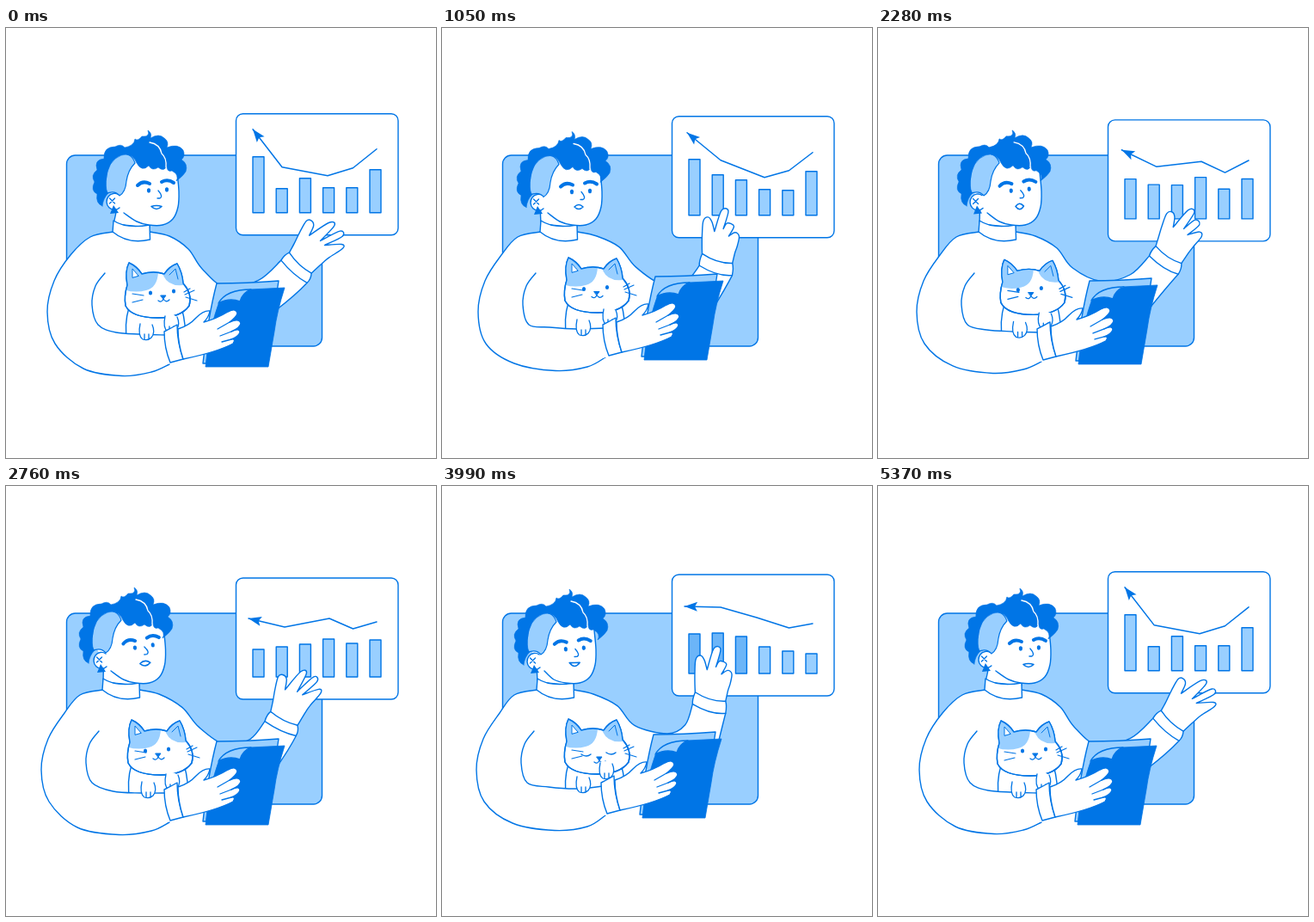
An HTML page with a canvas for the animation above (5400 ms loop, 500 by 500 pixels).

```html
<!DOCTYPE html>
<html>
<head>
<meta charset="utf-8">
<style>
html, body { margin: 0; width: 100%; height: 100%; overflow: hidden; background: #fff; }
canvas { display: block; width: 500px; height: 500px; }
</style>
</head>
<body>
<canvas id="stage" width="500" height="500"></canvas>
<script>
const ctx = document.getElementById('stage').getContext('2d');
const BLUE = '#0075e6', SKY = '#99cfff', WHITE = '#fff', LOOP = 5400;
const POSES = [0, 1050, 1710, 2760, 3990, 4770];
const BEATS = [0, 570, 1050, 1710, 2310, 2760, 3420, 3990, 4560, 4770, 5160];
let time = 0;

// Eased value at the current time; the last key leads back to the first.
function at(vals, keys = BEATS) {
  let i = keys.length - 1;
  while (keys[i] > time) i--;
  const end = keys[i + 1] ?? LOOP, next = vals[(i + 1) % vals.length];
  const u = (time - keys[i]) / (end - keys[i]);
  return vals[i] + (next - vals[i]) * u * u * (3 - 2 * u);
}
const pose = (...vals) => at(vals, POSES);
const beat = (...vals) => at(vals);

function shape(d, fill, stroke = BLUE, width = 1.4) {
  const p = new Path2D(d);
  if (fill) { ctx.fillStyle = fill; ctx.fill(p); }
  if (stroke) { ctx.strokeStyle = stroke; ctx.lineWidth = width; ctx.stroke(p); }
}
const line = (d, width, color = BLUE) => shape(d, null, color, width);

function dot(x, y, rx, ry = rx, fill = BLUE, stroke = null) {
  ctx.beginPath();
  ctx.ellipse(x, y, rx, ry, 0, 0, 7);
  ctx.fillStyle = fill;
  ctx.fill();
  if (stroke) { ctx.strokeStyle = stroke; ctx.lineWidth = 1.4; ctx.stroke(); }
}

function box(x, y, w, h, r, fill) {
  ctx.beginPath();
  ctx.roundRect(x, y, w, h, r);
  ctx.fillStyle = fill;
  ctx.fill();
  ctx.strokeStyle = BLUE;
  ctx.lineWidth = 1.4;
  ctx.stroke();
}

function group(x, y, draw, angle = 0) {
  ctx.save();
  ctx.translate(x, y);
  ctx.rotate(angle * Math.PI / 180);
  draw();
  ctx.restore();
}

// Smooth path text through points given as x, y, x, y...
function spline(...n) {
  const last = n.length / 2 - 1;
  const pt = i => { i = Math.max(0, Math.min(last, i)) * 2; return [n[i], n[i + 1]]; };
  let d = pt(0).join(' ');
  for (let i = 0; i < last; i++) {
    const [a, b, c, e] = [pt(i - 1), pt(i), pt(i + 1), pt(i + 2)];
    const p = k => b[k] + (c[k] - a[k]) / 6, q = k => c[k] - (e[k] - b[k]) / 6;
    d += `C${p(0)} ${p(1)} ${q(0)} ${q(1)} ${c[0]} ${c[1]}`;
  }
  return d;
}

function board() {
  const y = 103.4 - 3.7 * Math.cos((time + 150) / LOOP * 2 * Math.PI);
  group(0, y, () => {
    box(267.5, 0, 188.5, 141, 8, WHITE);
    const heights = [
      pose(65, 65, 65, 32, 46, 55), pose(28, 47, 46, 35, 47, 38),
      pose(40, 41, 41, 38, 43, 42), pose(29, 30, 54, 44, 31, 30),
      pose(29, 29, 29, 39, 26, 28), pose(50, 51, 51, 43, 23, 36)];
    const shade = beat(0, 0, 0, 0, 0, 0, .15, .3, 0, 0, 0);
    heights.forEach((h, i) => {
      const x = 287 + i * 27.2;
      box(x, 115 - h, 13, h, 0, SKY);
      if (i < 3 && shade) {
        ctx.globalAlpha = shade;
        shape(`M${x} ${115 - h}h13v${h}h-13z`, BLUE, null);
        ctx.globalAlpha = 1;
      }
    });
    const tx = pose(287, 285, 285, 282, 282, 284), ty = pose(18, 19, 19, 47, 37, 28);
    const bx = pose(321, 324, 324, 324, 324, 322), by = pose(62, 51, 51, 57, 38, 50);
    line(`M${tx} ${ty}L${bx} ${by}L${pose(374, 375, 376, 376, 366, 375)} ${pose(72, 71, 50, 47, 50, 62)}
      L403.5 ${pose(63, 63, 64, 59, 62, 63)}L431 ${pose(41, 42, 42, 51, 57, 50)}`, 1.5);
    group(tx, ty, () => shape('M0 0L15 -5.5L12 0L15 5.5Z', BLUE, null),
      Math.atan2(by - ty, bx - tx) * 180 / Math.PI);
  });
}

const OPEN = [-18, -1, -20, -13, -23, -27, -25, -42, -21, -46, -15, -43, -12, -31, -3, -57, 4, -58,
  2, -34, 13, -57, 19, -54, 9, -33, 24, -46, 28, -43, 22, -25, 20, -16, 17, 2, -20, 12, 20, 14];
const POINT = [-18, -5, -19, -14, -20, -28, -20, -43, -15, -48, -10, -43, -6, -32, 0, -57, 8, -57,
  4, -36, 8, -43, 16, -40, 11, -28, 18, -33, 23, -29, 22, -18, 20, -10, 18, 3, -20, 9, 19, 17];

// Torso, far sleeve and the raised hand
function torso(bx, by, nx, cy) {
  const wx = beat(343, 328, 320, 347, 338, 324, 318, 312, 317, 321, 340);
  const wy = beat(273, 272, 269, 258, 264, 270, 259, 246, 264, 269, 273);
  const deg = beat(38, 20, 5, 27, 25, 22, 13, 4, 18, 21, 36), a = deg * Math.PI / 180;
  const curl = beat(0, 0, 1, 1, .5, 0, .5, 1, .1, 0, 0);
  const n = OPEN.map((v, i) => v + (POINT[i] - v) * curl);
  const world = i => [wx + n[i] * Math.cos(a) - n[i + 1] * Math.sin(a),
    wy + n[i] * Math.sin(a) + n[i + 1] * Math.cos(a)];
  const [lx, ly] = world(36), [rx, ry] = world(38);
  const ex = pose(256, 256, 265, 255, 262, 254), ey = pose(302, 298, 286, 301, 288, 301);
  const top = spline(167 + nx, 237, 190 + nx, 242, 212 + nx * .6, 257 + by * .4,
    228 + nx * .3, 280 + by * .4, ex, ey, (ex + lx) / 2 + 6, (ey + ly) / 2 + 7, lx, ly);
  const outer = spline(125 + nx, 237, 98 + nx, 243, 75 + bx, 264, 56 + bx, 294, 48 + bx, 330,
    57 + bx, 367, 90 + bx, 396 + by, 135 + bx / 2, 404.5 + by, 169, 400 + by, 190, 391 + cy);
  shape(`M${top}L${rx} ${ry}Q${(rx + 322) / 2} ${ry + 15} 314 328L280 360L205 386L190 391
    L125 380L${60 + bx} 340L${80 + bx} 262L${125 + nx} 237Z`, WHITE, null);
  shape('M' + outer + `L190 340L${125 + nx} 237`, WHITE, null);
  line('M' + top);
  line('M' + outer);
  line(`M${rx} ${ry}Q${(rx + 322) / 2} ${ry + 15} 314 328`);

  group(wx, wy, () => {
    shape(`M${n[36]} ${n[37]}Q${n[36] - 1} 4 ${n[0]} ${n[1]}L${n[34]} ${n[35]}
      Q${n[38] + 1} 8 ${n[38]} ${n[39]}Q2 ${n[39] + 3} ${n[36]} ${n[37]}Z`, WHITE);
    shape('M' + spline(...n.slice(0, 14)) + 'L' + spline(...n.slice(12, 20)) +
      'L' + spline(...n.slice(18, 26)) + 'L' + spline(...n.slice(24, 36)) +
      `Q0 5 ${n[0]} ${n[1]}Z`, WHITE);
  }, deg);
}

function head(nx) {
  const hx = beat(0, -12, -14, -1, -9, -16, -17, -17, -13, -11, -3);
  const hy = pose(0, 1.5, 1, -1, 1, 1);
  const ex = beat(0, -10, -14, -4, -10, -15, -17, -18, -12, -9, -2);
  const fx = beat(0, -11, -15, -6, -11, -15.5, -18, -22, -14, -10, -2);
  const fy = pose(0, 1.5, 2, -2, .5, 1.5);

  shape(`M${129 + ex} 205Q${128 + ex} 217 ${125 + nx} 228L${167 + nx} 232L${168 + fx} 222Z`, WHITE);
  shape(`M${125 + nx} 224Q${140 + nx} 234 ${167 + nx} 229L${167.5 + nx} 246
    Q${142 + nx} 252 ${124 + nx} 237Z`, WHITE);
  shape('M' + spline(140 + ex, 218, 152 + fx, 225, 166 + fx, 229, 182 + fx, 229, 194 + fx, 222,
    200 + fx, 208, 201 + fx, 190, 199 + fx, 168) +
    `L${180 + hx} 148L${130 + hx} 148L${118 + ex} 185L${130 + ex} 206Z`, WHITE, null);
  line('M' + spline(137 + ex, 215, 152 + fx, 225, 166 + fx, 229, 182 + fx, 229, 194 + fx, 222,
    200 + fx, 208, 201 + fx, 190, 199 + fx, 168));

  group(hx, hy, () => {
    shape('M116 193Q114 160 129 148Q145 142 150 157Q142 165 140 178Q139 191 132 195Q126 188 116 193Z', SKY, BLUE, 1.2);
    shape(`M112 207Q104 204 106 193Q98 189 103 179Q98 171 106 165Q102 153 114 152Q113 138 127 138
      Q134 134 138 139Q149 137 150 129Q153 132 158 126Q168 127 165 119Q170 122 168 128
      Q178 122 184 128Q190 132 187 139Q200 134 206 142Q209 149 204 153Q212 158 209 167
      Q206 172 198 178Q202 171 193 166Q187 168 187 160Q184 168 177 162Q170 167 166 160
      Q158 168 152 157Q146 144 134 148Q118 154 116 178Q116 190 119 192Q113 198 112 207Z`, BLUE, BLUE, .6);
    line('M167 133Q179 135 181 146Q187 151 186 162', 1.3, WHITE);
  });

  group(ex, pose(0, 1, 0, 1, 2, 3.5), () => {
    shape('M132 209A9 9.5 0 1 1 131 194', WHITE);
    line('M120.5 198l6 6m0 -6l-6 6', 1.3);
    shape('M125 206L131 215L121 216Z', BLUE, null);
  });

  group(176 + fx, 195 + fy, () => {
    line('M-23 -12Q-17 -18 -9 -14M5 -16Q12 -20 19 -15', 4);
    dot(-10, -6, 2.1, 2.7);
    dot(11, -7, 2.1, 2.7);
    line('M1 -6Q7 1 3 3L0 3', 1.3);
    const w = pose(6, 5, 3, 6, 6, 3), up = pose(2, 5, 8, 5, 0, 7), down = pose(6, 5, 8, 6, 8, 7);
    group(pose(-1, -2, -2, 0, 0, 2), pose(12.5, 11.5, 12, 13, 10, 11.5), () =>
      shape(`M${-w} 0Q0 ${-up} ${w} 0Q0 ${down} ${-w} 0Z`, WHITE, BLUE, 1.6));
  }, pose(0, 0, 2, -6, -1, -11));
}

function cat() {
  const nap = time > 3600 && time < 4350;
  const fx = pose(0, -3, -4, -6, 0, 1), fy = pose(0, -4.5, -8, 0, 4, -3);
  group(pose(0, 4, 5, 3, 4, 1), pose(0, -6, -7, -1, -2, -1), () => {
    shape('M143 325Q137 345 141 366L208 366Q210 345 204 325Z', WHITE);
    const skull = `M141 299Q138 283 143 273Q152 277 158 286Q172 282 184 286Q190 277 199 274
      Q205 284 206 297Q217 309 213 323Q203 337 177 337Q146 337 139 323Q137 312 141 299Z`;
    shape(skull, WHITE);
    ctx.save();
    ctx.clip(new Path2D(skull));
    shape('M134 268L160 280L177 284Q176 302 163 305Q149 309 134 303Z', SKY, null);
    shape('M182 284L199 268L212 298Q190 303 183 288Z', SKY, null);
    ctx.restore();
    line(skull);
    shape('M147 290L147 280L154 288Z', WHITE, BLUE, 1);
    line('M190 287L197 280L200 292', 1);
    line('M147 309l13 2M147 319l12 -3M208 310l11 -5M209 313l13 4M207 307l7 -4', 1.2);
  });
  group(fx, fy, () => {
    if (nap) line('M162 308q6 4 11 0M191 306q6 4 11 0', 1.5);
    else { dot(168, 308, 2.1, 2.5); dot(195, 306, 2.1, 2.5); }
    shape('M180 311h6l-3 4z', BLUE, BLUE, 1);
    line('M177 317Q181 320 183 315Q186 320 190 316', 1.3);
  });
}

function paw(x, y) {
  group(x, y, () => {
    shape('M-7 -9Q-10 6 -4 10Q2 12 6 8Q11 2 7 -7Q0 -12 -7 -9Z', WHITE, null);
    line('M-7 -8Q-10 6 -4 10Q2 12 6 8Q11 2 7 -7M-2 10v-6M3 9v-5', 1.3);
  });
}

function nearArm(bx, by, cx, cy) {
  const inner = spline(115 + bx, 285, 104 + bx, 300, 100 + bx, 322, 107 + bx, 345,
    128 + bx / 2, 354 + by, 157, 356 + by, 186 + cx, 357 + cy);
  shape(`M${inner}L${191 + cx} ${390 + cy}Q140 ${404 + by} 90 ${390 + by}L${70 + bx} 340Z`, WHITE, null);
  line('M' + inner);
}

function papers(cx, cy) {
  group(cx, cy, () => {
    shape('M245 297Q280 297 317 294L302 390L229 390Q235 335 245 297Z', SKY);
    shape('M284 304L324 302Q315 330 312 353L305 394L232 394Q236 350 248 318Z', BLUE, BLUE, .8);
    shape('M247 320Q256 304 285 304Q275 308 272 318Q260 313 247 320Z', SKY);
    shape('M184 353Q192 349 199 345Q199 365 206 385L191 389Q184 372 184 353Z', WHITE);
    shape(`M200 350Q213 346 221 337Q230 328 237 329Q236 336 230 342Q245 338 258 330
      Q268 325 269 332Q268 336 260 342Q271 337 273 343Q273 348 262 353Q272 348 272 354
      Q270 359 262 362Q268 361 264 367Q245 377 206 385Q200 367 200 350Z`, WHITE);
    line('M260 342l-14 8M262 353l-13 5M262 362l-11 3', 1.3);
  });
}

function frame() {
  time = performance.now() % LOOP;
  ctx.fillStyle = WHITE;
  ctx.fillRect(0, 0, 500, 500);
  ctx.lineCap = ctx.lineJoin = 'round';
  const bx = beat(0, -7, -6, -1, -3, -7, -7, -8, -6, -3, 0);
  const by = beat(0, 2.5, -6, -6, -3, 1, 0, -4, -1, 0, 0);
  const nx = beat(0, -7, -10, -2, -7, -12, -13, -14, -9, -6, -1);
  const cx = beat(0, 0, 3, 3, 1, 0, 0, 1, 0, 0, 0);
  const cy = beat(0, 2, -8, -8, -3, 0, -2, -8, -3, -2, 0);
  box(70.5, 148, 297, 222, 10, SKY);
  board();
  torso(bx, by, nx, cy);
  head(nx);
  cat();
  nearArm(bx, by, cx, cy);
  paw(pose(163, 164, 164, 165, 164, 163), pose(352, 347, 346, 352, 346, 351));
  paw(pose(192, 195, 196, 193, 191, 191), pose(343, 335, 334, 343, 330, 338));
  papers(cx, cy);
  requestAnimationFrame(frame);
}
frame();
</script>
</body>
</html>
```
